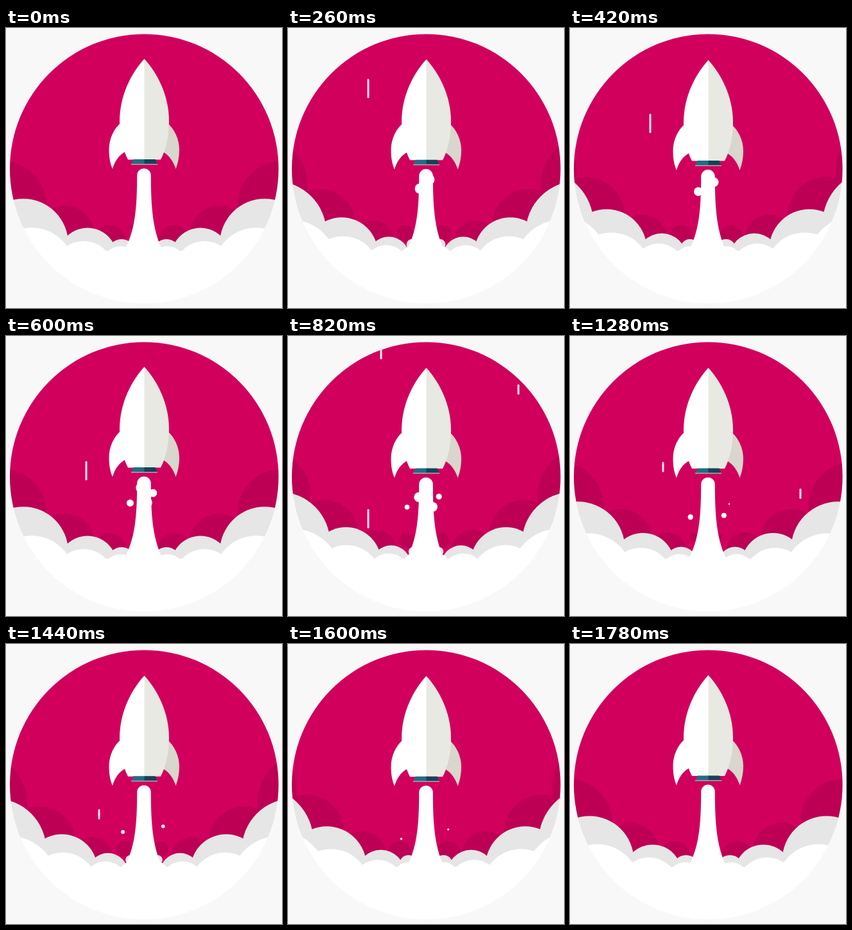
An HTML page with a canvas for the animation above (1.8 s loop, 430 by 435 pixels).

```html
<!DOCTYPE html>
<html lang="en">
<head>
<meta charset="utf-8">
<title>Rocket launch</title>
<style>
html, body { margin: 0; width: 100%; height: 100%; overflow: hidden; background: #f8f8f8; }
canvas { display: block; }
</style>
</head>
<body>
<canvas id="stage" width="430" height="435"></canvas>
<script>
const ctx = document.getElementById('stage').getContext('2d');
const LOOP = 1800, PUFF = 600, BOB = 300, STEP = 20;

// Every PUFF a cloud moves one key further out from the axis while it grows and rises.
const layers = [
  { color: '#bd0054', axis: 212, out: [14, 50, 120, 216, 312], top: 306, rise: 30, power: 1.72, size: 25, growth: 21 },
  { color: '#e6e6e6', axis: 215, out: [12, 35, 88, 188, 298], top: 328, rise: 17.4, power: 1.85, size: 22, growth: 24 },
  { color: '#fff', axis: 215, out: [12, 37, 94, 175, 261], top: 339, rise: 8, power: 1.85, size: 27, growth: 20 }
];

const bubbles = [
  { launch: 0, y: 242, vx: -.036, vy: .029 },
  { launch: 100, y: 231.5, vx: .028, vy: .025 },
  { launch: 480, y: 255.5, vx: .031, vy: .029 },
  { launch: 500, y: 229, vx: -.035, vy: .067 }
];

const streaks = [
  { x: 125, launch: 27, length: 30, speed: .339 },
  { x: 145, launch: 767, length: 16, speed: .381 },
  { x: 359, launch: 607, length: 16, speed: .352 }
];

function disc(x, y, r) {
  ctx.beginPath();
  ctx.arc(x, y, r, 0, 7);
  ctx.fill();
}

function fill(color, path) {
  ctx.fillStyle = color;
  ctx.fill(new Path2D(path));
}

function clouds({ color, axis, out, top, rise, power, size, growth }, p) {
  ctx.fillStyle = color;
  for (let i = 0; i < out.length - 1; i++) {
    const age = i + p - 1;
    const dx = out[i] + (out[i + 1] - out[i]) * p;
    const r = Math.max(0, size + growth * age);
    const y = top - rise * Math.max(0, age) ** power + r;
    disc(axis - dx, y, r);
    disc(axis + dx, y, r);
  }
}

function rocket() {
  fill('#d9d6cd', 'M252 148C262 157 270 172 270 189C270 200 268 210 264.500 219C261 208 255 198 244 192Z');
  fill('#fff', 'M178 148C168 157 160.500 172 160.500 189C160.500 200 162 210 166 219C169 208 175 198 186 192Z');
  fill('#fff', 'M215.500 48C196 69 177 104 177 145C177 168 182 189 190 204.500H217V50Z');
  fill('#e8e9e2', 'M215.500 48C235 69 254 104 254 145C254 168 249 189 241 204.500H215.500Z');
  fill('#236c84', 'M198.500 204H217V211.500H195Z');
  fill('#154257', 'M215.500 204H232.500L236 211.500H215.500Z');
  fill('#a9a9ad', 'M195 211H236V212.500H195Z');
}

function draw(t) {
  const bob = 2 * Math.sin(Math.PI * (t % BOB) / BOB);
  ctx.clearRect(0, 0, 430, 435);
  ctx.fillStyle = '#d1005d';
  disc(215.3, 218.7, 209.3);

  // Everything else is painted only inside the disc
  ctx.save();
  ctx.globalCompositeOperation = 'source-atop';

  ctx.fillStyle = '#f9e4ed';
  for (const { x, launch, length, speed } of streaks) {
    ctx.beginPath();
    ctx.roundRect(x - 1.5, (t - launch) * speed, 3, length, 1.5);
    ctx.fill();
  }

  for (const layer of layers) clouds(layer, t % PUFF / PUFF);
  ctx.fillRect(0, 346, 430, 89);

  for (const { launch, y, vx, vy } of bubbles) {
    const age = t - launch, r = 10 - .0075 * age;
    if (age >= 0 && r > .8) disc(215 + vx * age, y + vy * age, r);
  }

  ctx.translate(0, bob);
  fill('#fff', 'M204.200 229A10.800 10.800 0 0 1 225.800 229C225.800 280 229 318 245 347H183C201 318 204.200 280 204.200 229Z');
  rocket();
  ctx.restore();
}

function tick() {
  draw(Math.floor(performance.now() % LOOP / STEP) * STEP);
  requestAnimationFrame(tick);
}
tick();
</script>
</body>
</html>
```
